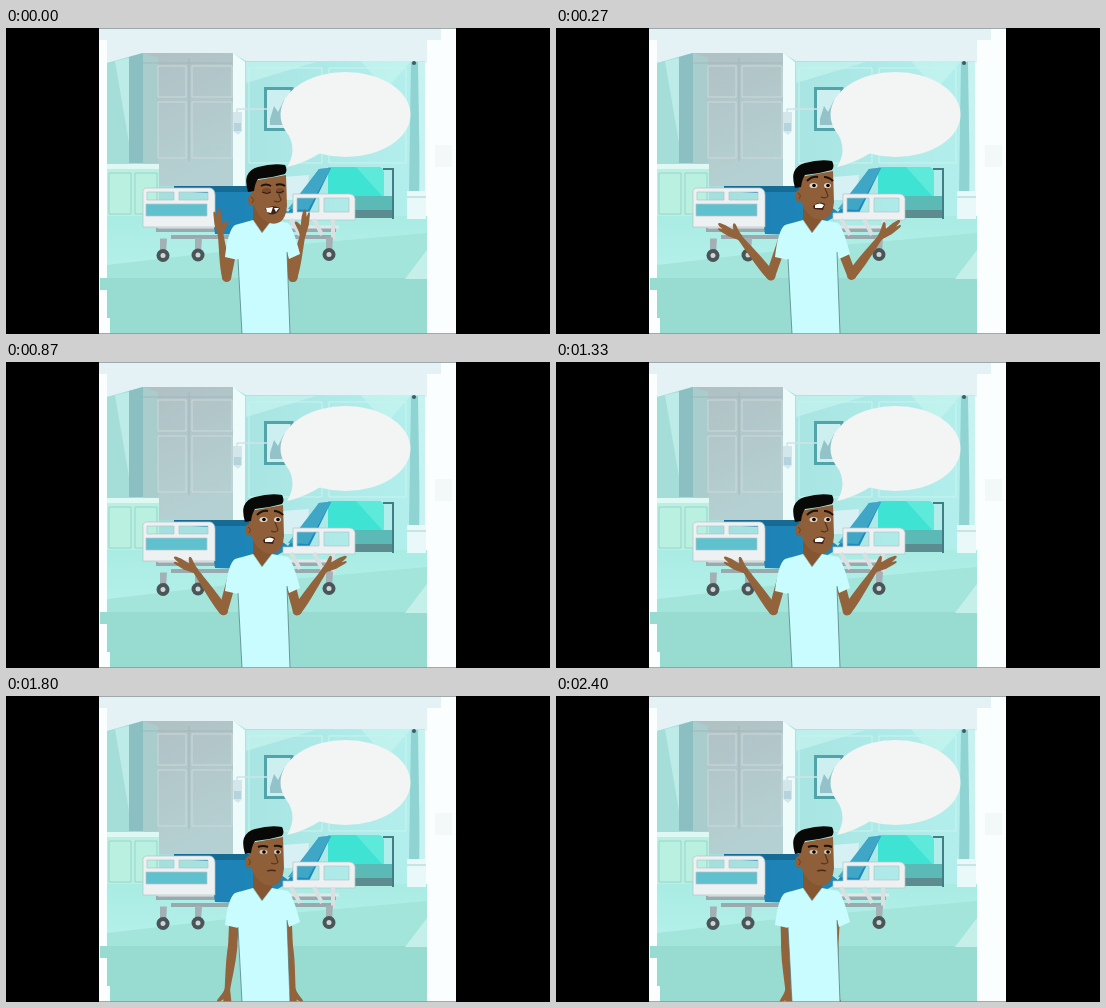
Animation, 544 px wide and 306 px high, one loop 2.47 s. Source, as an HTML page without scripts:

```html
<!DOCTYPE html>
<html lang="en">
<head>
<meta charset="utf-8">
<title>Ward talk</title>
<style>
@property --upper { syntax: "<angle>"; inherits: true; initial-value: 0deg }
@property --fore { syntax: "<angle>"; inherits: true; initial-value: 0deg }
@property --hand { syntax: "<angle>"; inherits: true; initial-value: 0deg }
@property --len { syntax: "<number>"; inherits: true; initial-value: 1 }

html, body { margin: 0; width: 100%; height: 100%; overflow: hidden; background: #000 }
svg { display: block; width: 100vw; height: 100vh }

/* Angles are absolute, measured from an arm hanging straight down. */
.arm { fill: #93633c }
.upper { transform: rotate(var(--upper)) }
.fore { transform: translateY(44px) rotate(calc(var(--fore) - var(--upper))) }
.bone { transform: scaleY(var(--len)) }
.hand { transform: translateY(calc(45px * var(--len))) rotate(calc(var(--hand) - var(--fore))) }

.left { animation: left 2470ms infinite }
.right { animation: right 2470ms infinite }
.head { animation: nod 2470ms infinite }
.plead, .worry, .calm { visibility: hidden; animation: plead 2470ms step-end infinite }
.worry { animation-name: worry }
.calm { animation-name: calm }

@keyframes left {
  0% { --upper: 11deg; --fore: 172deg; --hand: 174deg; --len: .98; animation-timing-function: steps(4) }
  10.9% { --upper: 19deg; --fore: 141deg; --hand: 121deg; --len: 1.1; animation-timing-function: steps(4) }
  21.4%, 53.8% { --upper: 15.5deg; --fore: 145deg; --hand: 121deg; --len: 1.08; animation-timing-function: steps(4) }
  64.7% { --upper: 9deg; --fore: 65deg; --hand: 56deg; --len: .78; animation-timing-function: steps(3) }
  72.8% { --upper: 3deg; --fore: 7deg; --hand: 5deg; --len: 1; animation-timing-function: steps(5) }
  86.2%, 100% { --upper: -1deg; --fore: -3deg; --hand: -2deg; --len: 1 }
}
@keyframes right {
  0% { --upper: 9deg; --fore: 167deg; --hand: 174deg; --len: .98; animation-timing-function: steps(4) }
  10.9% { --upper: 21deg; --fore: 143deg; --hand: 129deg; --len: 1.07; animation-timing-function: steps(4) }
  21.4%, 53.8% { --upper: 15deg; --fore: 146deg; --hand: 120deg; --len: 1.1; animation-timing-function: steps(4) }
  64.7% { --upper: 10deg; --fore: 64deg; --hand: 59deg; --len: .72; animation-timing-function: steps(3) }
  72.8% { --upper: 3deg; --fore: 6deg; --hand: 4deg; --len: 1; animation-timing-function: steps(5) }
  86.2%, 100% { --upper: -3deg; --fore: -1deg; --hand: -4deg; --len: 1 }
}
@keyframes nod {
  0% { transform: translate(3px, 6px); animation-timing-function: steps(4) }
  10.9% { transform: translate(0, 2px) }
  53.8% { transform: translate(0, 2px); animation-timing-function: steps(4) }
  64.7%, 100% { transform: none }
}
@keyframes plead { 0% { visibility: visible } 5.4%, 100% { visibility: hidden } }
@keyframes worry { 0% { visibility: hidden } 5.4% { visibility: visible } 59.3%, 100% { visibility: hidden } }
@keyframes calm { 0% { visibility: hidden } 59.3%, 100% { visibility: visible } }
</style>
</head>
<body>
<svg viewBox="0 0 544 306" preserveAspectRatio="none">
  <defs>
    <linearGradient id="wall" x2="1"><stop stop-color="#a0dcd9"/><stop offset="1" stop-color="#b3f0ed"/></linearGradient>
    <linearGradient id="closet" x2=".3" y2="1"><stop stop-color="#b0c0c3"/><stop offset="1" stop-color="#b5d0d2"/></linearGradient>
    <linearGradient id="floor" x2="0" y2="1"><stop stop-color="#a9ece4"/><stop offset="1" stop-color="#b5f1ea"/></linearGradient>
    <linearGradient id="sheet" x2="1"><stop stop-color="#1f7fb4"/><stop offset="1" stop-color="#1c8bbd"/></linearGradient>
    <g id="wheel">
      <path d="M-3-17H4L3-2H-3Z" fill="#a3b0b5"/>
      <circle r="6.5" fill="#4a5558"/><circle r="2.500" fill="#cdd6d8"/>
    </g>
    <g id="limb">
      <g class="upper">
        <path d="M-5 0L-4.600 44A4.600 4.600 0 0 0 4.600 44L5 0Z"/>
        <g class="fore">
          <path class="bone" d="M-4.600 0C-5.500 14-3.500 30-2.600 46H2.600C3.500 30 5.500 14 4.600 0A4.600 4.600 0 0 0-4.600 0Z"/>
          <path class="hand" d="M-2.600-2C-4 3-6 5-9 10Q-10 13-7 12L-3 9-3 18-2 24Q0 27 1 23L2 18 3 22Q5 24 5 20L5 10 2.600-2Z"/>
        </g>
      </g>
    </g>
    <clipPath id="frame"><path d="M93 0H450V306H93Z"/></clipPath>
  </defs>

  <path d="M0 0H544V306H0Z"/>
  <g clip-path="url(#frame)">
    <path d="M92 0H450V306H92Z" fill="#fafefe"/>
    <path d="M92 0H435V12H421V35H101V12H92Z" fill="#e4f2f5"/>

    <!-- room -->
    <path d="M101 35L136 25H226L240 33H419V192H101Z" fill="url(#wall)"/>
    <path d="M101 35L123 30V137H101Z" fill="#a5ddd9"/>
    <path d="M109 33L123 30V115Z" fill="#bdebe8"/>
    <path d="M123 29L137 25V135H123Z" fill="#8bbfc1"/>
    <path d="M137 25H227V158H153L137 135Z" fill="url(#closet)"/>
    <path d="M137 25L152 30V135H137Z" fill="#a9cccd"/>
    <path d="M227 25L239 34V165H227Z" fill="#edfbfb"/>
    <g fill="none" stroke="#cbd9db" stroke-width="1">
      <path d="M152 38H180V69H152ZM186 38H226V69H186ZM152 74H180V130H152ZM186 74H226V130H186Z"/>
      <path d="M183 30V133M137 35H226" stroke="#a0b4b8" stroke-width=".8"/>
      <path d="M243 40H316V135H243ZM323 40H400V135H323Z" stroke="#c9f4f0"/>
    </g>
    <path d="M240 34H310L270 46 240 55ZM355 33H405L380 62Z" fill="#c8f4f0" opacity=".65"/>
    <path d="M405 34H416L413 164H403Z" fill="#8fd3d2"/>
    <path d="M412 34H419V164H414Z" fill="#c8f2ef"/>
    <circle cx="408" cy="35" r="2" fill="#385d63"/>
    <path d="M259.500 60.500H286V101.500H259.500Z" fill="#cdeff0" stroke="#51a5aa" stroke-width="3"/>
    <path d="M264 91L268 78 272 84 278 72V97H264Z" fill="#93c3c8"/>

    <!-- floor -->
    <path d="M101 188H421V252H101Z" fill="url(#floor)"/>
    <path d="M101 237L230 222 421 205V252H101Z" fill="#a3e5db"/>
    <path d="M94 250H421V306H104V290H101V262H94Z" fill="#98dcd1"/>
    <path d="M421 222V251H399Z" fill="#c5f0ea"/>
    <path d="M429 117H446V139H429Z" fill="#f3f9f9"/>

    <!-- low cupboard -->
    <path d="M101 136H153V188H101Z" fill="#baf0e0"/>
    <path d="M101 136H153V141H101Z" fill="#e0f8f4"/>
    <path d="M103 145H125V186H103ZM129 145H151V186H129Z" fill="none" stroke="#97d3cd"/>

    <!-- far bed and drip -->
    <path d="M322 139H373Q378 140 378 147V170H322Z" fill="#3fe3d3"/>
    <path d="M350 139H373Q378 140 378 147V170Z" fill="#5eeadb"/>
    <path d="M345 168H388V190H345Z" fill="#5cbab6"/>
    <path d="M348 182H388V190H348Z" fill="#5d8c90"/>
    <path d="M377 141H387V191" fill="none" stroke="#427c84" stroke-width="2"/>
    <path d="M401 163H420V191H401Z" fill="#e9f8f8"/>
    <path d="M401 169H420" stroke="#a6d1d3"/>
    <path d="M231 81H262M231 81V90" fill="none" stroke="#cfe4e8" stroke-width="1.5"/>
    <path d="M227 84H236V103L232 107 227 103Z" fill="#d3e6ea"/>
    <path d="M228 95H235V103H228Z" fill="#b5d3dc"/>

    <!-- bed -->
    <path d="M150 202H330M165 209H326" stroke="#9aa9ae" stroke-width="4"/>
    <path d="M152 199H333" stroke="#e1e8ea" stroke-width="3"/>
    <path d="M277 149L303 147 301 172H277Z" fill="#d7f0f3"/>
    <path d="M168 158H248L282 184 313 141 325 140 303 185 277 190 246 207 209 206 203 165 168 163Z" fill="url(#sheet)"/>
    <path d="M282 181L313 141 325 140 302 182Z" fill="#3fa6c6"/>
    <path d="M168 158H247V164H168Z" fill="#166b94"/>
    <path d="M140 176H201V188H140Z" fill="#60c1ce"/>
    <g fill="#edf1f2" stroke="#b3c3c8" stroke-width=".7">
      <path fill-rule="evenodd" d="M140 160H204Q209 161 209 167V199H137V166Q136 161 140 160ZM141 164V172H168V164ZM173 164V172H202V164ZM140 176V188H201V176Z"/>
      <path fill-rule="evenodd" d="M287 166H344Q350 167 349 174V192H277V185H287ZM318 170V184H343V170ZM291 170V184H313V170Z"/>
    </g>
    <path d="M285 191L294 207M308 191L316 207M327 191V211" stroke="#d9e0e2" stroke-width="4"/>
    <use href="#wheel" x="157" y="227.500"/>
    <use href="#wheel" x="192" y="227"/>
    <use href="#wheel" x="323" y="226.500"/>

    <!-- speech bubble -->
    <g fill="#f3f4f4">
      <ellipse cx="339.500" cy="86.500" rx="65" ry="42.500"/>
      <path d="M281 104Q292 122 281 139Q299 135 316 124Z"/>
    </g>

    <!-- person -->
    <g transform="translate(229 206)"><g class="arm left"><use href="#limb"/></g></g>
    <g transform="translate(280 206) scale(-1 1)"><g class="arm right"><use href="#limb"/></g></g>
    <path d="M247 172H266V195L257 207 247 195Z" fill="#85562f"/>
    <path d="M247 192L256 205 266 192 282 195Q287 199 294 226L283 231 281 224 284 306H236L232 232 219 229Q222 202 229 197Z" fill="#c9fcfe"/>
    <path d="M232 231L236 306M281 224L284 306" fill="none" stroke="#49747c" stroke-width=".7"/>
    <path d="M247 192L256 205 266 192" fill="none" stroke="#8fcbd1" stroke-width=".7"/>

    <g class="head">
      <path d="M244 147L277 141 278 172Q277 184 271 188Q264 192 256 187Q249 182 246 174L243 160Z" fill="#8e5f38"/>
      <ellipse cx="243" cy="166" rx="4" ry="6" fill="#8e5f38"/>
      <path d="M242 163Q246 165 243 169" fill="none" stroke="#65401f"/>
      <path d="M239 158Q236 148 238 142Q241 135 249 133Q264 129 276 131Q279 136 276 140Q262 144 249 145Q246 149 245 157Z" fill="#080807"/>
      <path d="M269 158L272 166Q270 169 265 167" fill="none" stroke="#56351d" stroke-width="1.2"/>

      <g class="plead">
        <path d="M252 152Q257 149 262 152M267 151Q272 149 276 152" fill="none" stroke="#1c120a" stroke-width="2"/>
        <ellipse cx="257.500" cy="157" rx="4.500" ry="3" fill="#78492a"/>
        <ellipse cx="271" cy="157" rx="4" ry="3" fill="#78492a"/>
        <path d="M253 158Q258 161 262 158M267 158Q271 160 275 157" fill="none" stroke="#2c190e"/>
        <path d="M256 175Q263 170 271 174Q268 182 260 180Z" fill="#402016"/>
        <path d="M257 174L264 173 262 179 258 178ZM265 174H270L267 178Z" fill="#fff"/>
      </g>
      <g class="worry">
        <path d="M251 151Q256 146 262 147M268 147Q273 147 277 151" fill="none" stroke="#1c120a" stroke-width="2"/>
        <ellipse cx="257.500" cy="155.500" rx="4" ry="2.600" fill="#e3d6c6"/>
        <ellipse cx="271.500" cy="155.500" rx="3.500" ry="2.600" fill="#e3d6c6"/>
        <circle cx="258" cy="155.500" r="1.800"/><circle cx="272" cy="155.500" r="1.800"/>
        <path d="M257 176Q263 170 269 174L267 180 258 179Z" fill="#402016"/>
        <path d="M259 175Q264 172 268 175L266 178 259 178Z" fill="#fff"/>
      </g>
      <g class="calm">
        <path d="M252 151Q257 149 262 151M268 150Q272 149 276 151" fill="none" stroke="#1c120a" stroke-width="2"/>
        <ellipse cx="257.500" cy="156" rx="4" ry="2.200" fill="#d8c6b2"/>
        <ellipse cx="271.500" cy="156" rx="3.500" ry="2.200" fill="#d8c6b2"/>
        <circle cx="258" cy="156" r="1.800"/><circle cx="272" cy="156" r="1.800"/>
        <path d="M261 175Q266 173.500 270 175" fill="none" stroke="#4b281a" stroke-width="1.300"/>
      </g>
    </g>
    <path d="M92 .5H450M92 305.500H450" stroke="#8b9698" stroke-width=".8"/>
  </g>
</svg>
</body>
</html>
```
